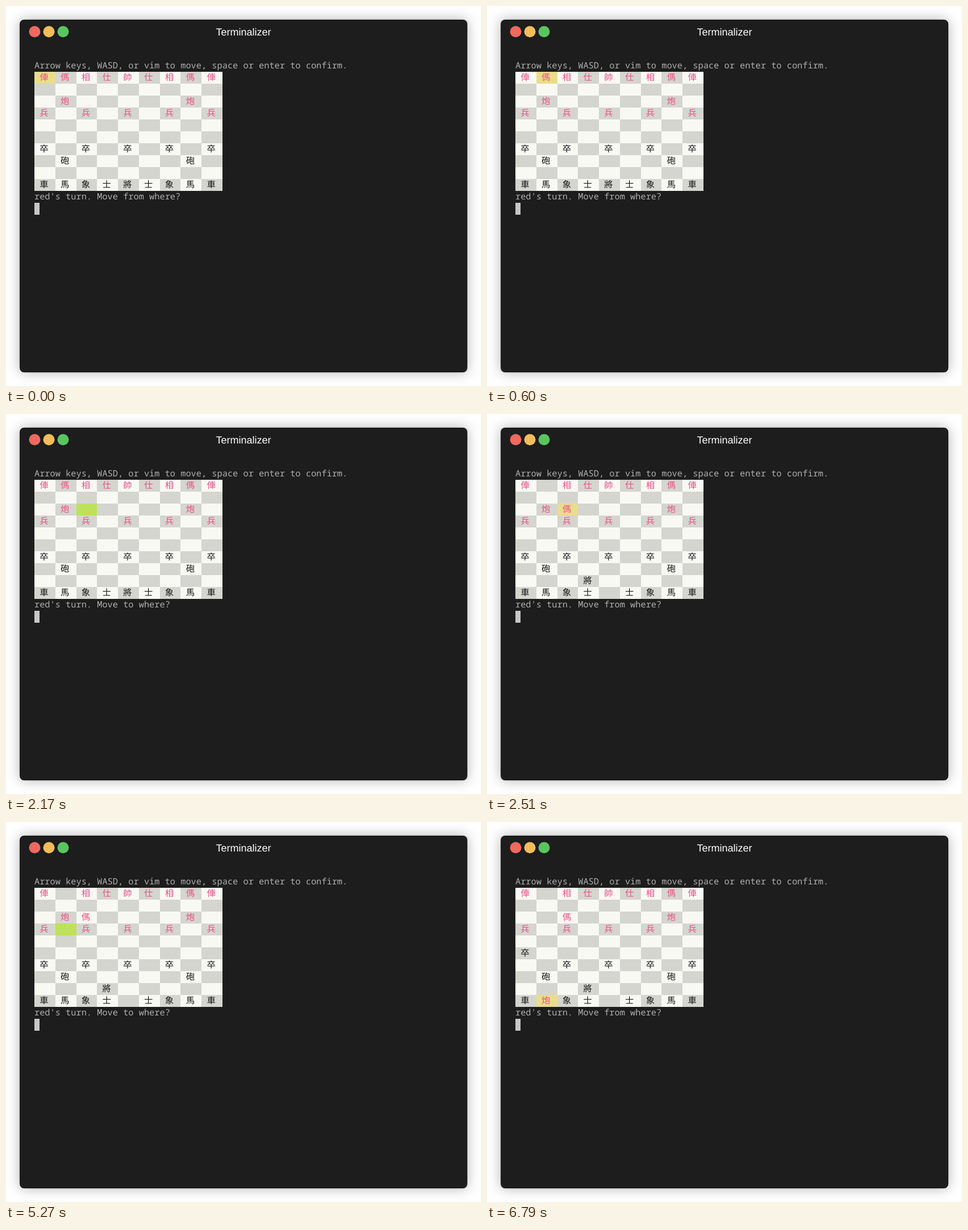
An HTML page for the animation above (8 s loop, 836 by 670 pixels).

```html
<!DOCTYPE html>
<html lang="en">
<head>
<meta charset="utf-8">
<title>Terminal xiangqi</title>
<style>
  html, body { margin: 0; width: 100%; height: 100%; overflow: hidden; background: #fff; }
  .window {
    position: absolute; left: 24px; top: 24px; width: 788px; height: 622px;
    border-radius: 8px; background: #1d1d1d; box-shadow: 0 0 22px rgba(0, 0, 0, .3);
  }
  svg { position: absolute; left: 0; top: 0; }
  text { white-space: pre; text-rendering: geometricPrecision; }
  rect { shape-rendering: crispEdges; }
  .title { font: 18px "Liberation Sans", Arial, sans-serif; fill: #fff; text-anchor: middle; }
  .line { font: 15.323px "Noto Sans Mono", monospace; fill: #afafaf; }
  .piece { font: 15.323px "Noto Sans CJK TC", "Noto Sans CJK JP", "Noto Sans CJK", sans-serif; }
</style>
</head>
<body>
<div class="window"></div>
<svg width="836" height="670" viewBox="0 0 836 670">
  <circle cx="50.5" cy="45.3" r="10" fill="#ee6a5f"/>
  <circle cx="75.5" cy="45.3" r="10" fill="#f5bd5a"/>
  <circle cx="100.5" cy="45.3" r="10" fill="#59c561"/>
  <text class="title" x="418" y="52">Terminalizer</text>
  <g id="screen"></g>
</svg>
<script>
const LOOP = 8000, LEFT = 50, TOP = 95, CHAR = 9.194, ROW = 21, COLS = 9;
const LIGHT = '#f9f9f4', DARK = '#d5d5d0', RED = '#ee4d84', BLACK = '#161616';
const CURSOR = { from: '#e9dd8d', to: '#bde25a' };
const RED_PIECES = '俥傌相仕帥炮兵';

const opening = [
  '俥傌相仕帥仕相傌俥',
  '         ',
  ' 炮     炮 ',
  '兵 兵 兵 兵 兵',
  '         ',
  '         ',
  '卒 卒 卒 卒 卒',
  ' 砲     砲 ',
  '         ',
  '車馬象士將士象馬車'
].map(row => [...row]);

function play(board, ...moves) {
  const next = board.map(row => [...row]);
  for (const [x1, y1, x2, y2] of moves) {
    next[y2][x2] = next[y1][x1];
    next[y1][x1] = ' ';
  }
  return next;
}
const second = play(opening, [1, 0, 2, 2], [4, 9, 3, 8]);
const third = play(second, [1, 2, 1, 9], [0, 6, 0, 5]);

// start time, board, selection mode, selected column and row; no board = cleared screen
const steps = [
  [0, opening, 'from', 0, 0],
  [500],
  [600, opening, 'from', 1, 0],
  [1040, opening, 'to', 1, 0],
  [1460, opening, 'to', 1, 1],
  [1890, opening, 'to', 1, 2],
  [2170, opening, 'to', 2, 2],
  [2410],
  [2510, second, 'from', 2, 2],
  [4380, second, 'from', 1, 2],
  [4910, second, 'to', 1, 2],
  [5270, second, 'to', 1, 3],
  [5460, second, 'to', 1, 4],
  [5630, second, 'to', 1, 5],
  [5790, second, 'to', 1, 6],
  [5930, second, 'to', 1, 7],
  [6100, second, 'to', 1, 8],
  [6310, second, 'to', 1, 9],
  [6690],
  [6790, third, 'from', 1, 9]
];

const lineTop = n => TOP + ROW * n;
const charX = n => LEFT + CHAR * n;
const line = (n, str) => `<text class="line" x="${LEFT}" y="${lineTop(n) + 15}">${str}</text>`;

function block(col, width, n, fill) {
  const x = Math.round(charX(col));
  const w = Math.round(charX(col + width)) - x;
  return `<rect x="${x}" y="${lineTop(n)}" width="${w}" height="${ROW}" fill="${fill}"/>`;
}

function cell(piece, x, y, fill) {
  const back = block(x * 4, 4, y + 1, fill);
  if (piece === ' ') return back;
  const ink = RED_PIECES.includes(piece) ? RED : BLACK;
  return back + `<text class="piece" x="${charX(x * 4 + 1)}" y="${lineTop(y + 1) + 15.2}" fill="${ink}">${piece}</text>`;
}

function render([, board, mode, selX, selY]) {
  let out = line(0, 'Arrow keys, WASD, or vim to move, space or enter to confirm.');
  if (!board) return out + block(0, 1, 1, '#c7c7c7');
  board.forEach((row, y) => row.slice(0, COLS).forEach((piece, x) => {
    const selected = x === selX && y === selY;
    out += cell(piece, x, y, selected ? CURSOR[mode] : (x + y) % 2 ? DARK : LIGHT);
  }));
  return out + line(11, `red's turn. Move ${mode} where?`) + block(0, 1, 12, '#c7c7c7');
}

const screen = document.getElementById('screen');
const start = performance.now();
let shown;

function tick() {
  const t = Math.max(0, performance.now() - start) % LOOP;
  const step = steps.findLast(s => s[0] <= t);
  if (step !== shown) {
    shown = step;
    screen.innerHTML = render(step);
  }
  requestAnimationFrame(tick);
}
tick();
</script>
</body>
</html>
```
